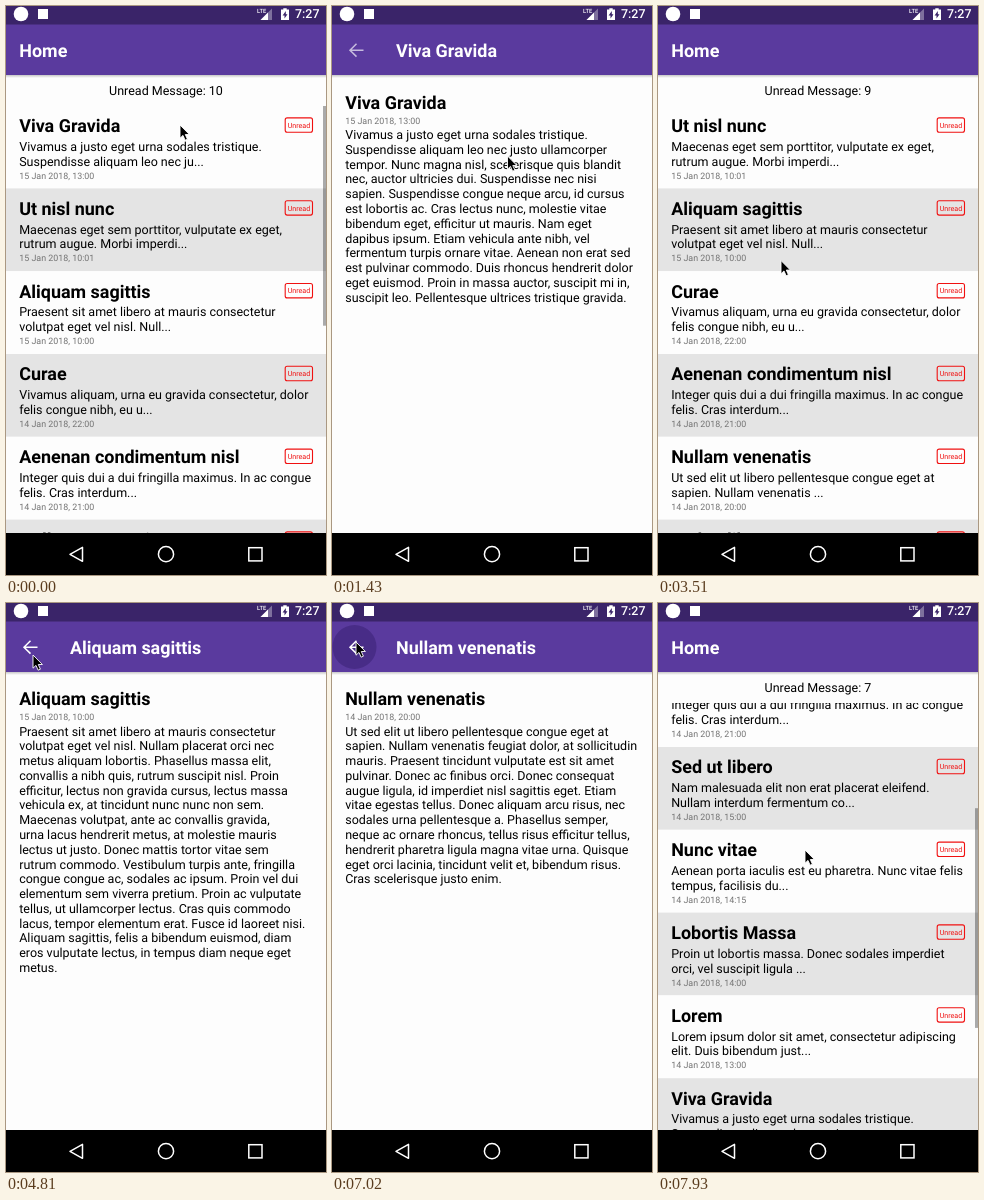
An HTML page that plays this animation: 320x569 px, repeating every 8000 ms.

```html
<!DOCTYPE html>
<html lang="en">
<head>
<meta charset="utf-8">
<title>Inbox</title>
<style>
  html, body { margin: 0; width: 100%; height: 100%; overflow: hidden; background: #fdfdfd; }
  svg { display: block; width: 100vw; height: 100vh; font-family: Roboto, sans-serif; }
  text { white-space: pre; fill: #000; text-rendering: geometricPrecision; }
  .title, .head { font-size: 17.95px; font-weight: 700; }
  .head { fill: #fff; }
  .body { font-size: 12.5px; }
  .date { font-size: 8.89px; fill: #737373; }
  .badge { font-size: 7.11px; fill: #f01010; text-anchor: middle; }
  .line { fill: none; stroke: #fff; stroke-width: 1.5; }
</style>
</head>
<body>
<svg viewBox="0 0 320 569" preserveAspectRatio="none">
  <defs>
    <clipPath id="listClip"><rect y="100" width="320" height="427"/></clipPath>
    <clipPath id="pageClip"><rect y="69" width="320" height="458"/></clipPath>
    <clipPath id="barClip"><rect y="19" width="320" height="50"/></clipPath>
    <linearGradient id="shade" x2="0" y2="1">
      <stop stop-color="#000" stop-opacity=".22"/>
      <stop offset="1" stop-color="#000" stop-opacity="0"/>
    </linearGradient>
  </defs>
  <rect width="320" height="569" fill="#fdfdfd"/>
  <text id="count" class="body" x="160" y="89.1" text-anchor="middle"></text>
  <g clip-path="url(#listClip)"><g id="list"></g></g>
  <rect id="thumb" x="317" y="100" width="3" height="219.7" fill="#000" fill-opacity=".33"/>
  <g clip-path="url(#pageClip)"><g id="page"></g></g>

  <rect y="69" width="320" height="3" fill="url(#shade)"/>
  <rect y="18" width="320" height="51" fill="#5a3a9e"/>
  <rect width="320" height="18.5" fill="#3a2469"/>
  <g clip-path="url(#barClip)"><circle id="ripple" cx="22.5" cy="44" fill="#3d2478" fill-opacity=".6"/></g>
  <text id="home" class="head" x="13.3" y="50.8">Home</text>
  <text id="head" class="head" x="64" y="50.8"></text>
  <path id="arrow" class="line" d="M31.5 44.2H18.5M24.5 37.8L18 44.2L24.5 50.6"/>

  <g fill="#fff">
    <circle cx="15" cy="8" r="7.3"/>
    <rect x="32" y="3" width="10" height="10"/>
    <text x="251" y="7" font-size="5.8" font-weight="500" style="fill:#fff">LTE</text>
    <path d="M266 2.5V14H254.5Z" opacity=".35"/>
    <path d="M262 6.5V14H254.5Z"/>
    <path fill-rule="evenodd" d="M275 3.5h2.3v-1.3h3.4v1.3h2.3V14h-8ZM279.8 5L276.6 9.4H278.5V12.6L281.5 8.2H279.8Z"/>
    <text x="289" y="12.4" font-size="12.44" font-weight="500" style="fill:#fff">7:27</text>
  </g>
  <rect y="527" width="320" height="42"/>
  <path class="line" stroke-linejoin="round" d="M76.5 541.3V555.3L64 548.3Z"/>
  <circle class="line" cx="160" cy="548.2" r="7.6"/>
  <rect class="line" x="242.8" y="541.7" width="13.2" height="13.2"/>
  <path id="cursor" d="M0 0V13.2L3 10.4L5.1 15.2L7.4 14.2L5.3 9.5H9.4Z" fill="#000" stroke="#fff" stroke-width=".9"/>
</svg>
<script>
const LOOP = 8000, STEP = 130, ROW = 82.8, TOP = 99.6, VIEW = 427;
const $ = id => document.getElementById(id);

// title, date, two-line preview, full text
const mails = [
  ["Viva Gravida", "15 Jan 2018, 13:00", "Vivamus a justo eget urna sodales tristique.\nSuspendisse aliquam leo nec ju...",
`Vivamus a justo eget urna sodales tristique.
Suspendisse aliquam leo nec justo ullamcorper
tempor. Nunc magna nisl, scelerisque quis blandit
nec, auctor ultricies dui. Suspendisse nec nisi
sapien. Suspendisse congue neque arcu, id cursus
est lobortis ac. Cras lectus nunc, molestie vitae
bibendum eget, efficitur ut mauris. Nam eget
dapibus ipsum. Etiam vehicula ante nibh, vel
fermentum turpis ornare vitae. Aenean non erat sed
est pulvinar commodo. Duis rhoncus hendrerit dolor
eget euismod. Proin in massa auctor, suscipit mi in,
suscipit leo. Pellentesque ultrices tristique gravida.`],
  ["Ut nisl nunc", "15 Jan 2018, 10:01", "Maecenas eget sem porttitor, vulputate ex eget,\nrutrum augue. Morbi imperdi..."],
  ["Aliquam sagittis", "15 Jan 2018, 10:00", "Praesent sit amet libero at mauris consectetur\nvolutpat eget vel nisl. Null...",
`Praesent sit amet libero at mauris consectetur
volutpat eget vel nisl. Nullam placerat orci nec
metus aliquam lobortis. Phasellus massa elit,
convallis a nibh quis, rutrum suscipit nisl. Proin
efficitur, lectus non gravida cursus, lectus massa
vehicula ex, at tincidunt nunc nunc non sem.
Maecenas volutpat, ante ac convallis gravida,
urna lacus hendrerit metus, at molestie mauris
lectus ut justo. Donec mattis tortor vitae sem
rutrum commodo. Vestibulum turpis ante, fringilla
congue congue ac, sodales ac ipsum. Proin vel dui
elementum sem viverra pretium. Proin ac vulputate
tellus, ut ullamcorper lectus. Cras quis commodo
lacus, tempor elementum erat. Fusce id laoreet nisi.
Aliquam sagittis, felis a bibendum euismod, diam
eros vulputate lectus, in tempus diam neque eget
metus.`],
  ["Curae", "14 Jan 2018, 22:00", "Vivamus aliquam, urna eu gravida consectetur, dolor\nfelis congue nibh, eu u..."],
  ["Aenenan condimentum nisl", "14 Jan 2018, 21:00", "Integer quis dui a dui fringilla maximus. In ac congue\nfelis. Cras interdum..."],
  ["Nullam venenatis", "14 Jan 2018, 20:00", "Ut sed elit ut libero pellentesque congue eget at\nsapien. Nullam venenatis ...",
`Ut sed elit ut libero pellentesque congue eget at
sapien. Nullam venenatis feugiat dolor, at sollicitudin
mauris. Praesent tincidunt vulputate est sit amet
pulvinar. Donec ac finibus orci. Donec consequat
augue ligula, id imperdiet nisl sagittis eget. Etiam
vitae egestas tellus. Donec aliquam arcu risus, nec
sodales urna pellentesque a. Phasellus semper,
neque ac ornare rhoncus, tellus risus efficitur tellus,
hendrerit pharetra ligula magna vitae urna. Quisque
eget orci lacinia, tincidunt velit et, bibendum risus.
Cras scelerisque justo enim.`],
  ["Sed ut libero", "14 Jan 2018, 15:00", "Nam malesuada elit non erat placerat eleifend.\nNullam interdum fermentum co..."],
  ["Nunc vitae", "14 Jan 2018, 14:15", "Aenean porta iaculis est eu pharetra. Nunc vitae felis\ntempus, facilisis du..."],
  ["Lobortis Massa", "14 Jan 2018, 14:00", "Proin ut lobortis massa. Donec sodales imperdiet\norci, vel suscipit ligula ..."],
  ["Lorem", "14 Jan 2018, 13:00", "Lorem ipsum dolor sit amet, consectetur adipiscing\nelit. Duis bibendum just..."]
];

// each visit opens a mail, then goes back
const visits = [
  { mail: 0, open: 1100, press: 2310, back: 2440 },
  { mail: 2, open: 3770, press: 4890, back: 5010 },
  { mail: 5, open: 6190, press: 6900, back: 7090 }
];

// cursor tip: time, x, y
const path = [
  [0, 174, 119], [390, 174, 121], [1040, 175.5, 150], [1560, 175.5, 150], [2210, 26, 44], [2500, 26, 44],
  [3250, 123, 257], [3900, 123, 250], [4290, 110, 225], [4810, 27, 52], [4890, 25, 47], [5100, 25, 47],
  [5850, 85, 389], [6300, 85, 389], [6830, 24, 39], [7130, 24, 39],
  [7540, 147, 451], [7930, 147, 247], [8000, 147, 225]
];
const DRAG = path[path.length - 3];

const clamp = v => Math.max(0, Math.min(1, v));
const mix = (a, b, u) => a + (b - a) * u;
const smooth = u => u * u * (3 - 2 * u);
const ramp = (t, start, span) => clamp((t - start) / span);

// cubic-bezier(.2833, .99, .3183, .99)
function glide(x) {
  const curve = (a, b, s) => 3 * a * s * (1 - s) ** 2 + 3 * b * s * s * (1 - s) + s ** 3;
  let lo = 0, hi = 1;
  for (let i = 0; i < 20; i++) {
    const mid = (lo + hi) / 2;
    if (curve(.2833, .3183, mid) < x) lo = mid; else hi = mid;
  }
  return x >= 1 ? 1 : curve(.99, .99, lo);
}

function cursorAt(t) {
  const i = Math.max(1, path.findIndex(p => p[0] > t));
  const [a, b] = [path[i - 1], path[i]];
  const u = smooth(ramp(t, a[0], b[0] - a[0]));
  return [mix(a[1], b[1], u), mix(a[2], b[2], u)];
}

const label = (cls, x, y, s) => `<text class="${cls}" x="${x}" y="${y}">${s}</text>`;
const lines = (s, y) => s.split("\n").map((l, i) => label("body", 13.2, y + i * 14.78, l)).join("");

function row(mail, i, unread) {
  const [title, date, preview] = mail;
  const badge = `<rect x="279.2" y="12.3" width="27.3" height="14.4" rx="2" fill="none" stroke="#f01010" stroke-width="1.1"/>`
    + label("badge", 292.9, 22.2, "Unread");
  return `<g transform="translate(0 ${TOP + i * ROW})">
    <rect width="320" height="${ROW}" fill="${i % 2 ? "#e4e4e4" : "#fdfdfd"}"/>
    ${label("title", 13.2, 26.4, title)}${lines(preview, 45.2)}${label("date", 13.3, 73, date)}
    ${unread ? badge : ""}</g>`;
}

function showList(read) {
  const rest = mails.filter((m, i) => !read.includes(i));
  const order = rest.concat(read.map(i => mails[i]));
  $("list").innerHTML = order.map((m, i) => row(m, i, i < rest.length)).join("");
  $("count").textContent = "Unread Message: " + rest.length;
}

function showPage([title, date, , text]) {
  $("page").innerHTML = `<rect y="69" width="320" height="510" fill="#fdfdfd"/>`
    + label("title", 13.2, 102.1, title) + label("date", 13.3, 116.9, date) + lines(text, 132.5);
  $("head").textContent = title;
}

let shown = -1;
function draw(t) {
  const opened = visits.filter(v => t >= v.open);
  const visit = opened[opened.length - 1];
  if (shown !== opened.length) {
    shown = opened.length;
    showList(opened.map(v => v.mail));
    if (visit) showPage(mails[visit.mail]);
  }

  let show = 0, arrow = 0, ripple = 0, fade = 0;
  if (visit) {
    const leaving = t >= visit.back;
    const u = ramp(t, leaving ? visit.back : visit.open, 500);
    show = leaving ? 1 - glide(u) : glide(u);
    arrow = leaving ? show : u;
    ripple = t < visit.press ? 0 : mix(8, 22, ramp(t, visit.press, 110));
    fade = 1 - ramp(t, visit.back, 200);
  }
  // the page turns solid just before it stops sliding
  const solid = clamp(show * 1.05);
  $("page").setAttribute("opacity", solid);
  $("page").setAttribute("transform", `translate(0 ${50 * (1 - show)})`);
  $("home").setAttribute("opacity", 1 - solid);
  $("head").setAttribute("opacity", solid);
  $("arrow").setAttribute("opacity", arrow);
  $("ripple").setAttribute("r", ripple);
  $("ripple").setAttribute("opacity", fade);

  const [x, y] = cursorAt(t);
  $("cursor").setAttribute("transform", `translate(${x} ${y})`);
  const scroll = t > DRAG[0] ? DRAG[2] - y : 0;
  $("list").setAttribute("transform", `translate(0 ${-scroll})`);
  $("thumb").setAttribute("y", 100 + scroll * VIEW / (ROW * mails.length));
  $("thumb").setAttribute("opacity", scroll ? 1 : 1 - ramp(t, 300, 300));
}

function tick() {
  draw(Math.floor(performance.now() % LOOP / STEP) * STEP);
  requestAnimationFrame(tick);
}
tick();
</script>
</body>
</html>
```
